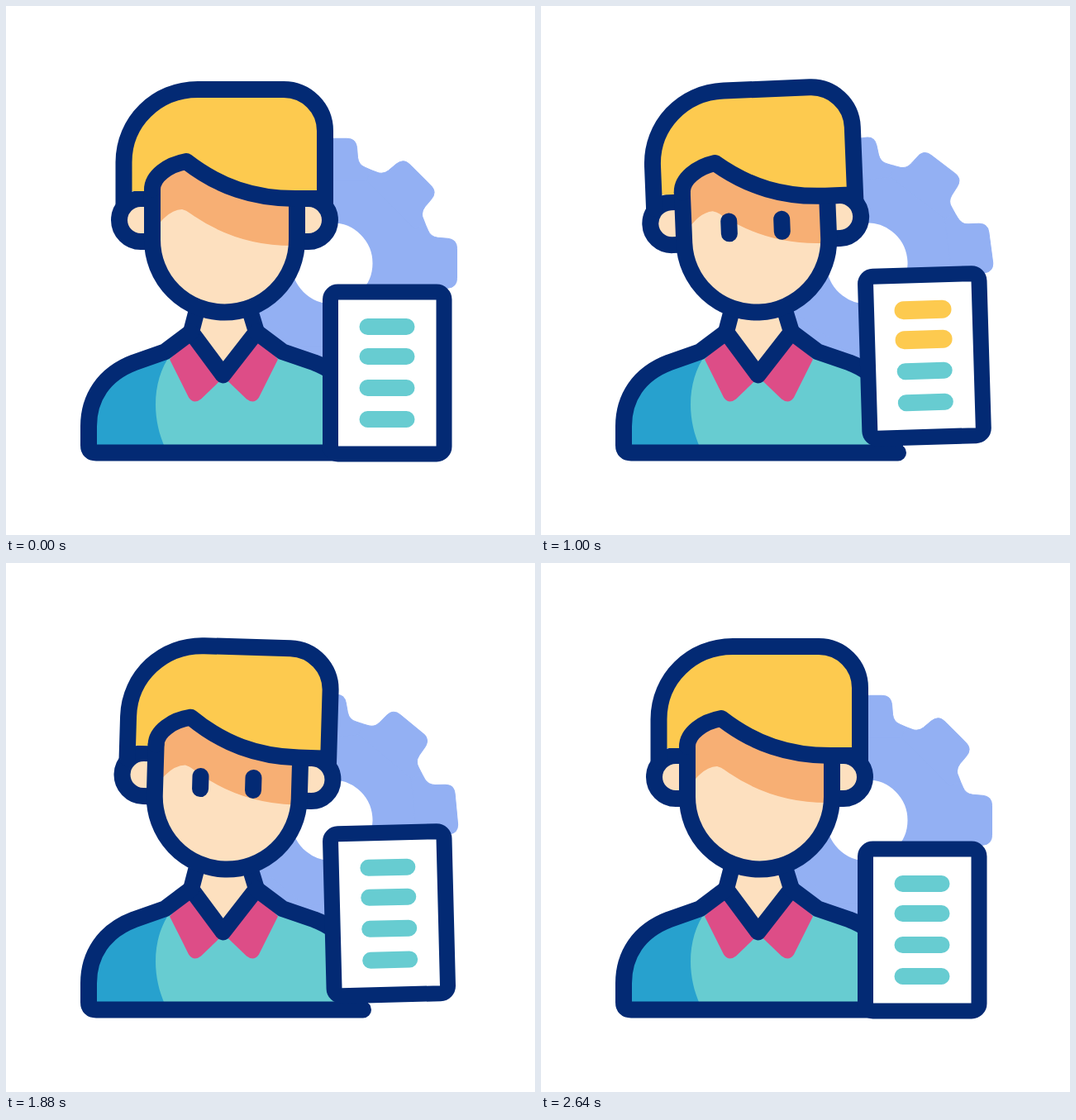
Animation of 640 by 640 pixels, one loop 2660 ms. Source, as an HTML page:

```html
<!DOCTYPE html>
<html>
<head>
<meta charset="utf-8">
<style>
  html, body { margin: 0; width: 100%; height: 100%; overflow: hidden; background: #fff; }
  svg { display: block; width: 100%; height: 100%; }
  .line { stroke: #032a74; stroke-width: 20; stroke-linecap: round; stroke-linejoin: round; }
  .skin { fill: #fde0bf; }
  .teal { fill: #67ccd1; }
  .spark { stroke: #fdca4f; stroke-width: 20.5; stroke-linecap: round; }
  .row { stroke: #67ccd1; stroke-width: 20; stroke-linecap: round; }
  .mark { stroke: #fdca4f; stroke-width: 22; stroke-linecap: round; }
</style>
</head>
<body>
<svg viewBox="0 0 640 640" fill="none">
  <defs>
    <path id="tooth" d="M100 -41.4L113 -46.8L116 -40Q119 -32 128 -31L140 -30Q151 -29 151 -18V18Q151 29 140 30L128 31Q119 32 116 40L113 46.8L100 41.4Z"/>
    <path id="collar" fill="#dd4d87" d="M198 427L221 473Q227 482 236 475L262 450L224 400Z"/>
  </defs>

  <g id="gear" fill="#93b0f3" stroke="#93b0f3">
    <circle r="82" fill="none" stroke-width="66"/>
  </g>

  <g transform="translate(0 .4)">
    <path class="teal" d="M224 394L192 418L155 431C118 445 100 474 100 508V540H428V508C428 474 410 445 373 431L335 418L303 394Z"/>
    <path fill="#27a1ce" d="M200 420C176 452 176 500 193 535H100V508C100 474 118 445 155 431Z"/>
    <use href="#collar"/>
    <use href="#collar" transform="translate(527) scale(-1 1)"/>
    <path class="skin line" d="M230 371L224 394L262.500 446L303 394L296 371"/>
    <path class="line" d="M224 394L192 418L155 431C118 445 100 474 100 508V531Q100 540 109 540H432M303 394L335 418L373 431C410 445 428 474 428 508V540"/>
  </g>

  <g id="head">
    <path class="skin line" d="M177 233H163A26 26 0 0 0 163 285H177M352 233H366A26 26 0 0 1 366 285H352"/>
    <path class="skin" d="M177 200V283A87.500 87.500 0 0 0 352 283V233Z"/>
    <path fill="#f7af74" d="M177 275Q194 247 213 246Q218 247 223 251Q278 290 346 290V230L218 186L177 215Z"/>
    <path fill="#fdca4f" d="M142.500 224V189C142.500 140 182 101 232 101H336A50 50 0 0 1 386 151V233H350C300 233 258 219 218 188C196 192 177 206 177 224Z"/>
    <path class="line" d="M177 222V283A87.500 87.500 0 0 0 352 283V235"/>
    <path class="line" d="M142.500 240V189C142.500 140 182 101 232 101H336A50 50 0 0 1 386 151V240M386 233H350C300 233 258 219 218 188C196 192 177 206 177 222"/>
    <path id="eyes" class="line"/>
  </g>

  <g id="tablet">
    <rect x="392.500" y="346" width="137.500" height="196" rx="9" fill="#fff" class="line" style="stroke-width:19"/>
  </g>

  <path class="spark" pathLength="100" d="M262 35A162 162 0 0 1 366 73"/>
  <path class="spark" pathLength="100" d="M415 48.500A138 138 0 0 1 587 177"/>
  <path class="spark" pathLength="100" d="M597 252A140 140 0 0 1 573 390"/>
</svg>
<script>
const LOOP = 2660;
const $ = id => document.getElementById(id);

function add(parent, tag, attrs) {
  const el = document.createElementNS('http://www.w3.org/2000/svg', tag);
  for (const name in attrs) el.setAttribute(name, attrs[name]);
  return parent.appendChild(el);
}

for (let i = 0; i < 8; i++) add($('gear'), 'use', { href: '#tooth', transform: `rotate(${i * 45})` });

const marks = [388, 424, 462, 500].map(y => {
  const d = `M437.500 ${y}H484.500`;
  add($('tablet'), 'path', { class: 'row', d });
  return add($('tablet'), 'path', { class: 'mark', d, pathLength: 100 });
});
const sparks = document.querySelectorAll('.spark');

// Progress over a span of time, plain or eased at both ends
const linear = (t, start, span) => Math.min(1, Math.max(0, (t - start) / span));
const ease = (t, start, span) => {
  const p = linear(t, start, span);
  return p * p * (3 - 2 * p);
};

// Swing from rest through the poses, one on each of five beats
const sway = (t, poses) => poses.reduce((value, pose, i) =>
  value + (pose - value) * ease(t, 30 + i * LOOP / 5, 280), 0);

// Show only the part of a path between two fractions
function trim(el, start, end) {
  el.style.display = end - start > 0.001 ? '' : 'none';
  el.setAttribute('stroke-dasharray', `${(end - start) * 100} 300`);
  el.setAttribute('stroke-dashoffset', -start * 100);
}

// Grow a path from its start, then erase it the same way
function streak(t, el, start, span) {
  trim(el, ease(t, start + span * 0.42, span * 0.58), ease(t, start, span * 0.55));
}

function draw(t) {
  const nod = ease(t, 1000, 320);
  const head = -2.3 * (ease(t, 0, 400) - nod) + 5.9 * (nod - ease(t, 1440, 680));
  const lift = -20.5 * (ease(t, 0, 700) - ease(t, 1800, 700));
  const open = ease(t, 480, 140) - ease(t, 2180, 140);

  $('gear').setAttribute('transform', `translate(394.5 311.3) rotate(${sway(t, [15, -7.5, -3.8, -5.4, 0])})`);
  $('head').setAttribute('transform', `rotate(${head} 264 378)`);
  $('tablet').setAttribute('transform', `translate(0 ${lift}) rotate(${sway(t, [0.9, -1.7, 0.9, -1.5, 0])} 461 354)`);

  const half = Math.max(0.01, 17.5 * open - 10);
  $('eyes').setAttribute('d', [232, 296].map(x => `M${x} ${266.5 - half}v${2 * half}`).join(''));
  $('eyes').style.strokeWidth = Math.min(20, 35 * open);
  $('eyes').style.display = open > 0 ? '' : 'none';

  marks.forEach((el, i) => trim(el, linear(t, 1250 + i * 100, 100), linear(t, 805 + i * 100, 90)));
  streak(t, sparks[0], 205, 670);
  streak(t, sparks[1], 1086, 690);
  streak(t, sparks[2], 2170, 465);
}

const began = performance.now();
function tick() {
  draw((performance.now() - began) % LOOP);
  requestAnimationFrame(tick);
}
tick();
</script>
</body>
</html>
```
